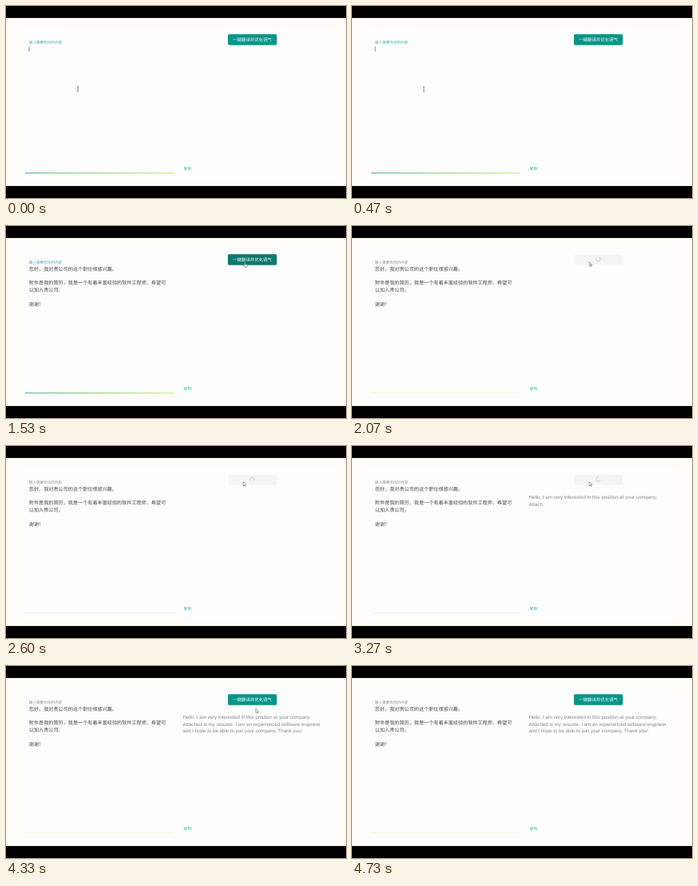
Write an HTML page that moves like this. It is 426 by 240 pixels and loops after 4790 ms.

```html
<!DOCTYPE html>
<html lang="zh-CN">
<head>
<meta charset="utf-8">
<style>
  html, body { margin: 0; width: 100%; height: 100%; overflow: hidden; background: #000; }
  svg { display: block; width: 100vw; height: 100vh; font-family: "Noto Sans CJK SC", "Noto Sans CJK", sans-serif; }
  text { text-rendering: geometricPrecision; white-space: pre; }
  .body { font-size: 6.14px; fill: #444; }
  .result { font-family: "Liberation Sans", Arial, sans-serif; font-size: 6.17px; fill: #868686; }
</style>
</head>
<body>
<svg viewBox="0 0 426 240">
  <defs>
    <linearGradient id="focus" gradientUnits="userSpaceOnUse" x1="24" y1="0" x2="211" y2="0">
      <stop offset="0" stop-color="#3fa886"/>
      <stop offset=".5" stop-color="#84d068"/>
      <stop offset="1" stop-color="#c2ee70"/>
    </linearGradient>
  </defs>
  <rect width="426" height="240"/>
  <rect y="15" width="426" height="210" fill="#fdfcf9"/>
  <rect x="15" y="27" width="397" height="191" rx="2" fill="#fdfdfe"/>

  <text id="label" x="28.8" y="47.2" font-size="4.6">输入需要优化的内容</text>
  <rect id="caret" x="28.7" y="50.6" width=".7" height="6.4" fill="#555"/>
  <g id="draft" class="body"></g>
  <rect id="line" x="24" y="208.3" width="187"/>

  <g id="button">
    <rect x="278" y="36" width="61.3" height="13.6" rx="1.6" fill="#000" opacity=".15"/>
    <rect id="face" x="278" y="35.3" width="61.3" height="13.4" rx="1.6"/>
    <text x="308.6" y="44.1" font-size="5.45" text-anchor="middle" fill="#fff">一键翻译并优化语气</text>
  </g>
  <g id="loading">
    <rect x="278.5" y="36" width="60.5" height="12.4" rx="1.5" fill="#f5f5f5"/>
    <path id="spinner" d="M0-2.7A2.7 2.7 0 1 1-2.7 0" fill="none" stroke="#bdbcb2" stroke-width=".7"/>
  </g>

  <g id="result" class="result"></g>
  <rect x="222" y="197" width="183" height=".6" fill="#faf9ea"/>
  <text x="222.6" y="205.3" font-size="5" fill="#35c0a2">复制</text>

  <g id="pointer">
    <path id="beam" d="M-1-2.7H1M0-2.7V2.7M-1 2.7H1" fill="none" stroke="#555" stroke-width=".7"/>
    <path id="arrow" d="M0 0V5L1.2 4L2.1 6L3 5.6L2.1 3.7H3.6Z" fill="#fff" stroke="#55667c" stroke-width=".6"/>
    <path id="hand" d="M-.6.4Q0-.5.6.4V2.3L2.8 2.9Q3.3 3.2 3.1 4.1L2.5 6H-.6L-2.2 3.7Q-2.2 2.9-1.3 3.2L-.6 3.8Z" fill="#fff" stroke="#33484a" stroke-width=".5"/>
  </g>
</svg>
<script>
const LOOP = 4790;
const PASTE = 630, CLICK = 1680, TYPE = 2920, DONE = 3830;
const RATE = 0.193; // characters per ms

const draftLines = [
  '您好，我对贵公司的这个职位很感兴趣。', '',
  '附件是我的简历，我是一个有着丰富经验的软件工程师，希望可',
  '以加入贵公司。', '', '谢谢！'
];
const resultLines = [
  'Hello, I am very interested in this position at your company.',
  'Attached is my resume. I am an experienced software engineer',
  'and I hope to be able to join your company. Thank you!'
];
// time, x, y
const path = [
  [0, 90, 103.7], [1130, 90, 103.7], [1450, 299.4, 45.6],
  [CLICK, 299.4, 45.6], [CLICK + 250, 297.2, 44.8], [3750, 297.2, 44.8],
  [DONE, 299.4, 45.6], [4270, 299.4, 45.6], [4600, 450, 130], [LOOP, 450, 130]
];

const $ = id => document.getElementById(id);
const show = (id, on) => { $(id).style.display = on ? '' : 'none'; };

function addLines(id, lines, x, y) {
  return lines.map((line, i) => {
    const el = document.createElementNS('http://www.w3.org/2000/svg', 'text');
    el.setAttribute('x', x);
    el.setAttribute('y', y + i * 8.77);
    el.textContent = line;
    $(id).append(el);
    return el;
  });
}

addLines('draft', draftLines, 28.8, 55.8);
const typed = addLines('result', resultLines, 221.4, 65.8);

function pointerAt(t) {
  const i = path.findIndex(p => p[0] > t);
  const [t0, x0, y0] = path[i - 1], [t1, x1, y1] = path[i];
  const k = (t - t0) / (t1 - t0), e = k * k * (3 - 2 * k);
  return [x0 + (x1 - x0) * e, y0 + (y1 - y0) * e];
}

function draw(t) {
  const focused = t < CLICK;
  const loading = t >= CLICK && t < DONE;
  const [x, y] = pointerAt(t);
  const hover = x > 278 && x < 339 && y > 35 && y < 49;
  const overField = x < 211;

  show('caret', t < 530);
  show('draft', t >= PASTE);
  show('button', !loading);
  show('loading', loading);
  show('beam', overField);
  show('hand', hover && !loading);
  show('arrow', !overField && (!hover || loading));

  $('label').setAttribute('fill', focused ? '#45aba4' : '#8c8c8c');
  $('line').setAttribute('fill', focused ? 'url(#focus)' : '#f6f5c4');
  $('line').setAttribute('height', focused ? 1 : 0.7);
  $('face').setAttribute('fill', hover ? '#0b776d' : '#079488');
  $('pointer').setAttribute('transform', `translate(${x} ${y})`);
  $('spinner').setAttribute('transform', `translate(308.5 41.6) rotate(${t * 0.36})`);

  let left = Math.max(0, Math.floor((t - TYPE) * RATE));
  resultLines.forEach((line, i) => {
    typed[i].textContent = line.slice(0, left);
    left = Math.max(0, left - line.length);
  });
}

const start = performance.now();
function tick() {
  draw((performance.now() - start) % LOOP);
  requestAnimationFrame(tick);
}
tick();
</script>
</body>
</html>
```
